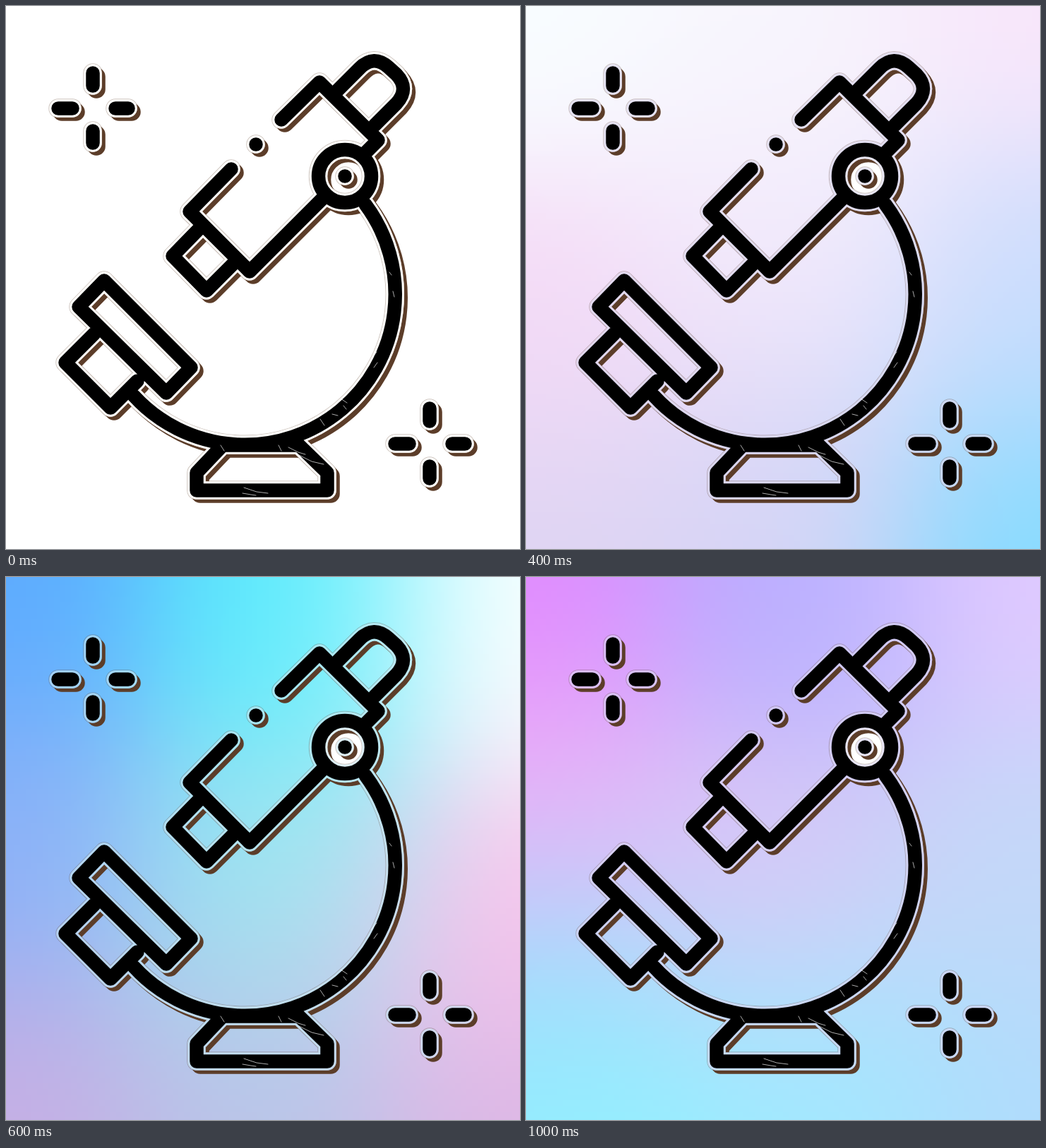
Write an HTML page with a canvas that moves like this. It is 728 by 769 pixels and loops after 1200 ms.

```html
<!DOCTYPE html>
<html lang="en">
<head>
<meta charset="utf-8">
<title>Microscope</title>
<style>
  html, body { margin: 0; width: 100%; height: 100%; overflow: hidden; background: #fff; }
  canvas, svg { position: absolute; inset: 0; width: 100%; height: 100%; display: block; }
</style>
</head>
<body>
<canvas id="sky" width="91" height="96"></canvas>
<svg viewBox="0 0 728 769" preserveAspectRatio="none">
  <defs>
    <path id="spark" d="M0-50v18M0 32v17M-49 0h20M32 0h18"/>
    <g id="icon" fill="none" stroke-linecap="round" stroke-linejoin="round">
      <use href="#spark" x="123" y="145"/>
      <use href="#spark" x="600" y="620"/>
      <!-- eyepiece -->
      <path d="M470 119L501 88Q521 68 542 87L553 97Q572 117 553 138L522 169"/>
      <!-- tube -->
      <path d="M390 161L444 108L527 190L507 210M354 196h.01M319 231L260 291L345 376L450 271"/>
      <!-- objective -->
      <path d="M275 314L236 354L284 403L325 362"/>
      <!-- hinge and arm -->
      <circle cx="480" cy="241" r="37.5"/>
      <path d="M480 241h.01M509 281A213 213 0 0 1 181 552"/>
      <!-- stage and holder -->
      <path d="M139 389L262 512L227 548L103 426ZM125 464L84 505L148 569L186 531"/>
      <!-- foot -->
      <path d="M307 622L270 661V686H455V661L415 622Z"/>
    </g>
    <mask id="outside" maskUnits="userSpaceOnUse" x="0" y="0" width="728" height="769">
      <rect width="728" height="769" fill="#fff"/>
      <use href="#icon" stroke="#000" stroke-width="25.5"/>
    </mask>
  </defs>
  <circle cx="480" cy="241" r="30" fill="#fff"/>
  <g mask="url(#outside)" stroke="#5c3d29">
    <use href="#icon" stroke-width="27.5" opacity=".3"/>
    <use href="#icon" stroke-width="25.5" transform="translate(5 5)"/>
  </g>
  <use id="rim" href="#icon" stroke-width="25.5" opacity=".6"/>
  <use href="#icon" stroke="#000" stroke-width="19.5"/>
  <g fill="none" stroke="#fff" stroke-width=".9" opacity=".75" stroke-linecap="round">
    <path d="M335 690l12 2 7 1M337 682l18 6 16 2M386 622l4 8M400 625l14 7 10 3M415 636l18 9 17 4M304 622l5 8"/>
    <path d="M474 556l9 6M478 566l4 5M462 578l8 2M517 500l8-10M521 512l5-7M543 377l3 4M548 404l2 8M445 585l6 9"/>
  </g>
</svg>
<script>
const STEP = 200, SPREAD = 2 * 21 * 21;

// Each scene: rim colour, then colour spots as "x% y% colour".
const scenes = [
  ['#fffdf8', '50 50 ffffff'],
  ['#ffd9c0', '0 0 f8a08e', '45 8 f9b8a2', '100 0 fad9ca', '90 28 fac2b2', '97 56 f8aa8e',
    '50 55 f8c3a0', '0 98 f7df98', '45 100 f5c294', '100 100 f0a490', '0 48 f8b694'],
  ['#d9d5ea', '0 0 f8fdff', '50 10 f8f6fd', '100 0 f9e6fa', '0 62 f5daf6', '50 48 f2e8fb',
    '100 55 cbdcfd', '0 100 dcd4f2', '50 92 d6d4f6', '100 100 82dbff'],
  ['#c9e4ee', '0 0 5caaff', '55 6 58edfc', '98 8 ffffff', '0 50 8cb0f8', '52 56 9ee9f0',
    '98 66 fdc6ed', '0 100 c8aee4', '50 96 bac4e8', '100 100 d8b4e4'],
  ['#efe6d4', '0 0 ffa878', '50 5 fdf0a6', '100 4 fcf8ae', '0 54 ffb6c6', '58 38 fbeecb',
    '53 65 9af0e2', '100 62 a4cff9', '0 94 a4a6f4', '38 98 38bffb', '100 100 4ea6ff'],
  ['#d9d4f0', '0 0 e188ff', '50 3 b8b0ff', '100 0 e1caff', '0 44 f0b2f6', '45 55 d9caf6',
    '100 55 c4d8f8', '0 78 98e0fd', '10 100 90f5ff', '55 96 a0eaff', '100 100 b0dbfc']
];

const ctx = sky.getContext('2d');

function paintSky(spots) {
  const { width, height } = sky;
  const image = ctx.createImageData(width, height);
  const points = spots.map(spot => {
    const [x, y, hex] = spot.split(' ');
    const n = parseInt(hex, 16);
    return { x, y, rgb: [n >> 16, n >> 8 & 255, n & 255] };
  });
  for (let i = 0; i < width * height; i++) {
    const x = (i % width + .5) / width * 100;
    const y = (Math.floor(i / width) + .5) / height * 100;
    const sum = [0, 0, 0];
    let total = 0;
    for (const p of points) {
      const weight = Math.exp(-((x - p.x) ** 2 + (y - p.y) ** 2) / SPREAD);
      total += weight;
      p.rgb.forEach((c, k) => sum[k] += c * weight);
    }
    image.data.set([...sum.map(c => Math.round(c / total)), 255], i * 4);
  }
  return image;
}

const skies = scenes.map(([, ...spots]) => paintSky(spots));
const start = performance.now();
let shown = -1;

function draw(now) {
  const index = Math.floor(Math.max(0, now - start) / STEP) % scenes.length;
  if (index !== shown) {
    shown = index;
    ctx.putImageData(skies[index], 0, 0);
    rim.setAttribute('stroke', scenes[index][0]);
  }
  requestAnimationFrame(draw);
}
draw(start);
</script>
</body>
</html>
```
